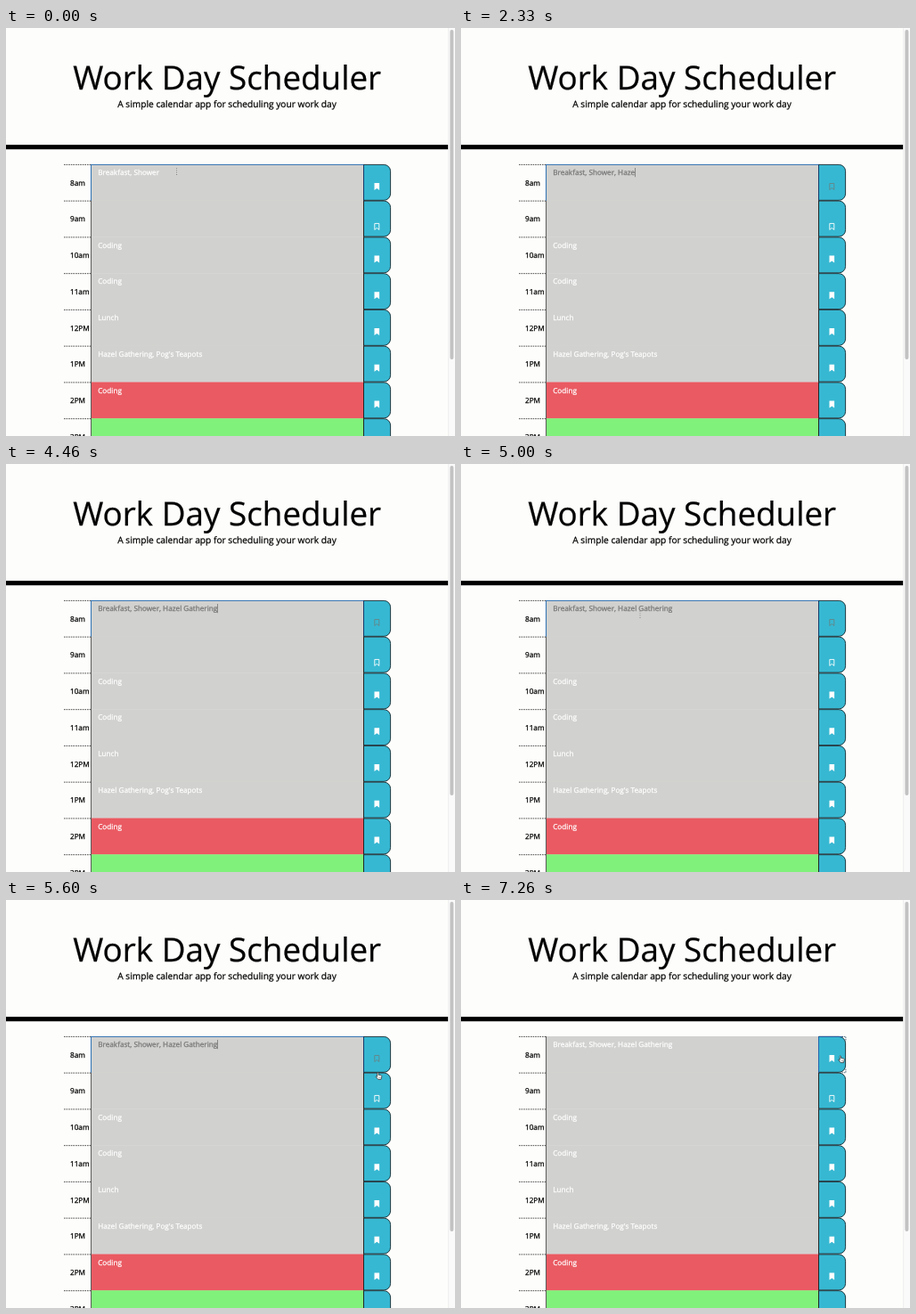
An HTML page with a canvas that plays this animation: 504x458 px, repeating every 7400 ms.

```html
<!DOCTYPE html>
<html lang="en">
<head>
<meta charset="utf-8">
<title>Work Day Scheduler</title>
<style>
html, body { margin: 0; width: 100%; height: 100%; overflow: hidden; background: #fdfdfb; }
canvas { display: block; width: 504px; height: 458px; }
</style>
</head>
<body>
<canvas id="stage"></canvas>
<script>
const W = 504, H = 458, LOOP = 7400;
const canvas = document.getElementById('stage');
const ctx = canvas.getContext('2d');
const ratio = window.devicePixelRatio || 1;
canvas.width = W * ratio;
canvas.height = H * ratio;

const TOP = 153, ROW = 40.75;
const LABEL_X = 65, AREA_X = 96, AREA_R = 401.5, BTN_R = 431.6;
const GREY = '#d1d1cf', RED = '#ea5a62', GREEN = '#80f17a', TEAL = '#37b8d2';
const BODY = 8.2, TEXT_X = 103.2, TEXT_Y = 12;

const rows = [
  { hour: '8am', color: GREY },
  { hour: '9am', color: GREY, text: '' },
  { hour: '10am', color: GREY, text: 'Coding' },
  { hour: '11am', color: GREY, text: 'Coding' },
  { hour: '12PM', color: GREY, text: 'Lunch' },
  { hour: '1PM', color: GREY, text: "Hazel Gathering, Pog's Teapots" },
  { hour: '2PM', color: RED, text: 'Coding' },
  { hour: '3PM', color: GREEN, text: '' }
];

// Typing: one character per key time
const BASE = 'Breakfast, Shower', ADDED = ', Hazel Gathering';
const keys = [330, 460, 1730, 2000, 2130, 2330, 2530, 2660, 2730, 3000,
  3200, 3260, 3460, 3600, 3730, 3860, 4460];
const PRESS = 6730, SAVE = 6860;

// Pointer path as [time, x, y], sampled at the update times
const path = [[5000, 201, 169], [5060, 211, 179.3], [5330, 316, 195], [5600, 418.5, 197.5],
  [5730, 421, 189], [5860, 423.5, 183], [6060, 424, 180], [6460, 425, 178.7],
  [7200, 426, 178.7], [7260, 427, 178.7]];
const ticks = [5800, 5860, 6000, 6060, 6330, 6400, 6460, 7200, 7260];
for (let i = 0; i < 12; i++) ticks.push(5000 + Math.floor(i * 6.67) * 10);
ticks.sort((a, b) => a - b);

// The thin outline gives the slightly heavier look of smoothed screen text
function text(str, x, y, size, color, align = 'left') {
  ctx.font = `${size}px "Open Sans", sans-serif`;
  ctx.textAlign = align;
  ctx.fillStyle = ctx.strokeStyle = color;
  ctx.lineWidth = 0.25;
  ctx.fillText(str, x, y);
  ctx.strokeText(str, x, y);
}

function rect(x, y, w, h, color) {
  ctx.fillStyle = color;
  ctx.fillRect(x, y, w, h);
}

function line(points, color, width = 1, dash = []) {
  ctx.beginPath();
  points.forEach(([x, y]) => ctx.lineTo(x, y));
  ctx.strokeStyle = color;
  ctx.lineWidth = width;
  ctx.setLineDash(dash);
  ctx.stroke();
  ctx.setLineDash([]);
}

function bookmark(y, filled, color) {
  const x = 416.3, w = filled ? 2.8 : 2.5, h = filled ? 3.9 : 3.5;
  ctx.beginPath();
  ctx.moveTo(x - w, y - h);
  ctx.lineTo(x + w, y - h);
  ctx.lineTo(x + w, y + h);
  ctx.lineTo(x, y + h - 2);
  ctx.lineTo(x - w, y + h);
  ctx.closePath();
  if (filled) {
    ctx.fillStyle = color;
    ctx.fill();
  } else {
    ctx.strokeStyle = color;
    ctx.lineWidth = 0.9;
    ctx.stroke();
  }
}

function button(y) {
  ctx.beginPath();
  ctx.roundRect(AREA_R, y + 0.4, BTN_R - AREA_R, ROW - 0.8, [0, 7.4, 7.4, 0]);
  ctx.fillStyle = TEAL;
  ctx.fill();
  ctx.strokeStyle = '#12282e';
  ctx.lineWidth = 0.9;
  ctx.stroke();
}

function header() {
  text('Work Day Scheduler', 248.2, 68.9, 36.8, '#000', 'center');
  text('A simple calendar app for scheduling your work day', 248, 88.8, 10.2, '#000', 'center');
  rect(0, 131.1, 496.5, 5.1, '#000');
  rect(496.5, 0, 7.5, H, '#fafafa');
  rect(496.5, 0, 0.6, H, '#e6e6e6');
  ctx.beginPath();
  ctx.roundRect(498.4, 2, 4, 370, 2);
  ctx.fillStyle = '#c2c2c2';
  ctx.fill();
}

function schedule() {
  rows.forEach((row, i) => {
    const y = TOP + i * ROW;
    line([[LABEL_X, y + 0.4], [AREA_X, y + 0.4]], '#222', 0.8, [1.6, 1]);
    text(row.hour, 72, y + 23.6, BODY, '#000');
    rect(AREA_X, y, AREA_R - AREA_X, ROW + 0.3, row.color);
    button(y);
    if (row.text) {
      text(row.text, TEXT_X, y + TEXT_Y, BODY, '#fff');
      bookmark(y + 25, true, '#fff');
    }
  });
  bookmark(TOP + ROW + 29.2, false, '#fff');
  line([[95.5, TOP], [95.5, H]], '#333', 0.8);
  line([[AREA_R, TOP], [AREA_R, H]], '#222', 0.8);
}

function caretOn(t) {
  if (t < keys[0] || t >= PRESS) return false;
  const last = keys.filter(k => k <= t).pop();
  // Each key press restarts the blink
  return Math.floor((t - last + 30) / 530) % 2 === 0;
}

function entry(t) {
  const typed = keys.filter(k => k <= t).length;
  const str = BASE + ADDED.slice(0, typed);
  const editing = typed > 0 && t < SAVE;
  text(str, TEXT_X, TOP + TEXT_Y, BODY, editing ? '#767676' : '#fff');
  if (caretOn(t)) {
    rect(TEXT_X + ctx.measureText(str).width, TOP + 4, 0.6, 10.2, '#555');
  }
  bookmark(TOP + 25, !editing, editing ? '#668587' : '#fff');
}

function focusRing(t) {
  const y = TOP + 0.4, bottom = TOP + ROW;
  if (t < PRESS) {
    line([[95.5, bottom], [95.5, y], [AREA_R, y]], '#2f72b4');
    line([[AREA_R, y], [AREA_R, bottom]], '#123a68');
  } else {
    line([[AREA_R, bottom], [AREA_R, y], [BTN_R - 3, y]], '#2364ac');
    line([[BTN_R - 4, y], [BTN_R + 0.3, y], [BTN_R + 0.3, y + 4]], '#24435c', 0.8, [1.5, 0.8]);
    line([[BTN_R + 0.3, bottom - 4], [BTN_R + 0.3, bottom], [BTN_R - 4, bottom]], '#24435c', 0.8, [1.5, 0.8]);
  }
}

function pointerAt(t) {
  if (t < keys[0]) return [191.7, 161];
  if (t < path[0][0]) return null;
  const now = ticks.filter(k => k <= t).pop();
  const next = path.findIndex(p => p[0] > now);
  if (next < 0) return path[path.length - 1].slice(1);
  const a = path[next - 1], b = path[next];
  const f = (now - a[0]) / (b[0] - a[0]);
  return [a[1] + (b[1] - a[1]) * f, a[2] + (b[2] - a[2]) * f];
}

function beam(x, y) {
  line([[x, y - 4], [x, y + 4]], '#f2f2f0', 1.5);
  line([[x, y - 3.8], [x, y + 4]], '#444', 0.8, [1.2, 1]);
}

function hand(x, y) {
  ctx.save();
  ctx.translate(x, y);
  ctx.beginPath();
  ctx.moveTo(-1.7, 0.8);
  ctx.lineTo(-1.9, -3.3);
  ctx.quadraticCurveTo(-1.2, -4.6, -0.5, -3.3);
  ctx.lineTo(-0.4, -1.2);
  ctx.lineTo(2.6, -0.7);
  ctx.quadraticCurveTo(3.5, -0.3, 3.2, 1);
  ctx.lineTo(2.5, 3.9);
  ctx.lineTo(-0.8, 3.9);
  ctx.lineTo(-3.3, 0.8);
  ctx.quadraticCurveTo(-3.2, -0.4, -1.7, 0.8);
  ctx.closePath();
  ctx.fillStyle = '#fff';
  ctx.fill();
  ctx.strokeStyle = '#222';
  ctx.lineWidth = 0.7;
  ctx.stroke();
  ctx.restore();
  line([[x + 0.3, y + 1], [x + 0.3, y + 2.7]], '#555', 0.5);
  line([[x + 1.6, y + 1], [x + 1.6, y + 2.7]], '#555', 0.5);
}

function draw(t) {
  ctx.setTransform(ratio, 0, 0, ratio, 0, 0);
  ctx.textRendering = 'geometricPrecision';
  ctx.lineJoin = 'round';
  rect(0, 0, W, H, '#fdfdfb');
  header();
  schedule();
  entry(t);
  focusRing(t);
  const pos = pointerAt(t);
  if (pos) (pos[0] > AREA_R ? hand : beam)(...pos);
}

const start = performance.now();
function tick() {
  draw((performance.now() - start) % LOOP);
  requestAnimationFrame(tick);
}
tick();
</script>
</body>
</html>
```
